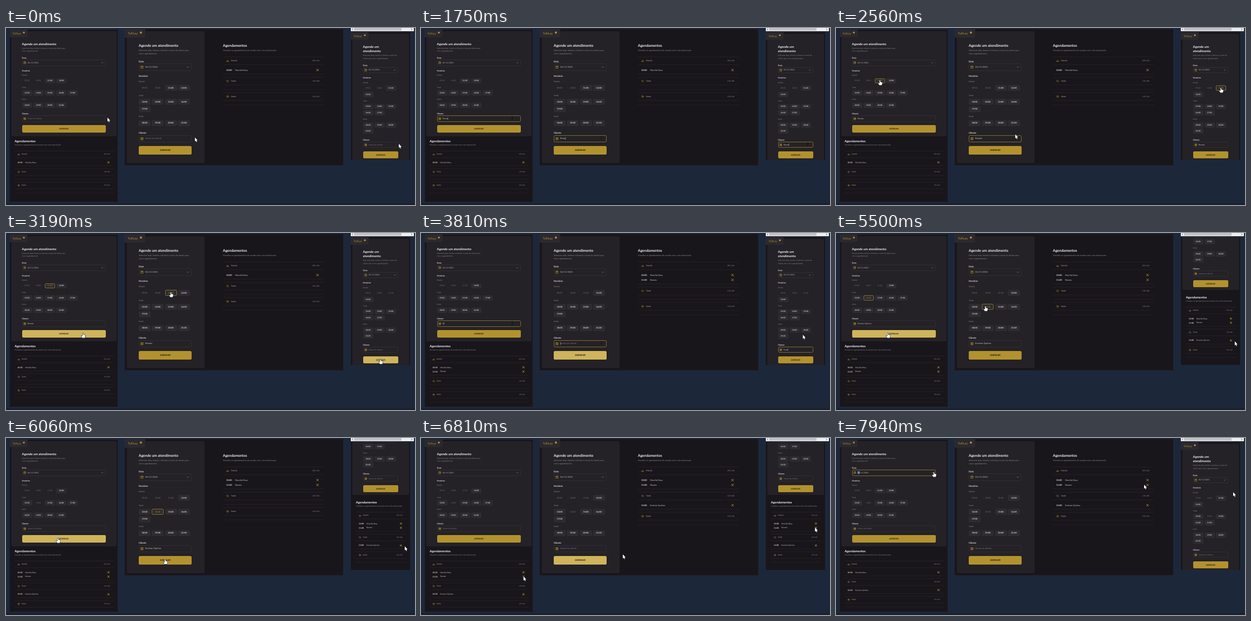
Animation, 758 px wide and 330 px high, one loop 8 s. Source, as an HTML page with a canvas:

```html
<!DOCTYPE html>
<html lang="pt-BR">
<head>
<meta charset="utf-8">
<title>Agendamentos</title>
<style>
  html, body { margin: 0; width: 100%; height: 100%; overflow: hidden; background: #1d273a; }
  canvas { display: block; }
</style>
</head>
<body>
<canvas id="stage" width="758" height="330"></canvas>
<script>
const ctx = document.getElementById('stage').getContext('2d');
ctx.textRendering = 'geometricPrecision';
ctx.textBaseline = 'middle';

const LOOP = 8000, STEP = 62.5, HOVER_LAG = 200;
const GOLD = '#b2922f', LIGHT_GOLD = '#cfb45c', OUTLINE = '#9a8033', CROSS = '#c9a93a',
      TITLE = '#f1eff3', TEXT = '#dedbe0', SOFT = '#8d8991', DIM = '#77737b',
      VIEW = '#19161b', PANEL = '#242226', SLOT = '#2e2b31', LINE = '#353238', RULE = '#29262c';
const BRAND = 'TuftLay';
const GUEST = 'Marcília Rosa';
const CLIENTS = ['Renato', 'Everton Quirino'];
const TYPE_DELAY = 200, TYPE_STEP = [150, 40];
const PERIODS = [
  { name: 'Manhã', first: 9, last: 12, span: '09h-12h' },
  { name: 'Tarde', first: 13, last: 17, span: '13h-18h' },
  { name: 'Noite', first: 18, last: 21, span: '19h-21h' }
];
const TITLE_LINES = ['Agende um atendimento'];
const INTRO_LINES = ['Selecione data, horário e informe o nome do cliente para', 'criar o agendamento'];

// Script entries: time of the click, what is clicked (a number is an hour,
// a point is a plain move) and how far along its width.
const VIEWS = [
  {
    x: 7, y: 3, w: 200, h: 321, s: 0.87, cols: 5, panel: [195, 196],
    list: { x: 16, w: 184, y: 211 }, title: TITLE_LINES, intro: INTRO_LINES,
    script: [[0, [188, 167]], [700, 'client', 0.9], [2500, 11], [3230, 'book', 0.73],
      [3550, 'client', 0.9], [4600, [49, 121]], [4850, 14], [5550, 'book', 0.43],
      [7000, 'remove'], [7650, 'date', 0.98]]
  },
  {
    x: 220, y: 2, w: 405, h: 254, s: 1, cols: 4, panel: [144, 246],
    list: { x: 402, w: 187, y: 33 }, title: TITLE_LINES, intro: INTRO_LINES,
    script: [[0, [350, 204]], [850, 'client', 0.9], [3100, 11], [3600, 'book'],
      [3750, 'client', 0.9], [5400, 14, 0.3], [6150, 'book'], [7020, [374, 217]], [7850, [571, 87]]]
  },
  {
    x: 639, y: 8, w: 110, h: 238, s: 0.87, cols: 3, panel: [105, 237],
    list: { x: 648.5, w: 93.5, y: 262 }, title: ['Agende um', 'atendimento'],
    intro: ['Selecione data, horário e informe o nome do', 'cliente para criar o agendamento'],
    scroll: t => 142 * (ease((t - 5050) / 300) - ease((t - 7200) / 300)),
    script: [[0, [728, 216]], [700, 'client', 0.85], [2350, 11], [3150, 'book'], [3430, 'client', 0.85],
      [4250, 14], [4420, [713, 182]], [4650, [710, 203]], [4950, 'book'], [5450, [739, 202]],
      [6950, 'remove', 0], [7800, [736, 101]]]
  }
];
VIEWS.forEach(view => { view.parts = layout(view); });

function ease(p) {
  p = Math.min(1, Math.max(0, p));
  return p * p * (3 - 2 * p);
}

// Flows the form downwards; returns the boxes of its controls and its labels.
function layout({ x: left, y: top, s, cols, panel, title, list }) {
  const x = left + 26 * s, w = panel[0] - 46 * s;
  const parts = { x, labels: [], slots: {}, titleY: top + 31 * s };
  let y = parts.titleY + (title.length - 1) * 10 * s;
  const down = d => y += d * s;
  const bar = height => ({ x, y: y - height * s / 2, w, h: height * s });
  const label = (str, size, color, weight) => parts.labels.push([str, x, y, size * s, color, weight]);
  parts.introY = y + 8.7 * s;

  down(29.5); label('Data', 4.4, TEXT, 700);
  down(10.4); parts.date = bar(13.4);
  down(17.1); label('Horários', 4.4, TEXT, 700);
  down(-4.3);
  for (const { name, first, last } of PERIODS) {
    down(14.2); label(name, 3.65, SOFT, 400);
    down(11.8);
    for (let hour = first; hour <= last; hour++) {
      const col = (hour - first) % cols;
      if (hour > first && !col) down(13.4);
      parts.slots[hour] = { x: x + col * 24.3 * s, y: y - 5.6 * s, w: 22 * s, h: 11.2 * s };
    }
  }
  down(18.6); label('Cliente', 4.4, TEXT, 700);
  down(10.5); parts.client = bar(13.4);
  down(21.7); parts.book = bar(15.6);
  parts.remove = { x: list.x + list.w - 13.6 * s, y: list.y + 52.5 * s, w: 4 * s, h: 4 * s };
  return parts;
}

function place(view, [time, target, along = 0.5]) {
  if (Array.isArray(target)) return target;
  const { x, y, w, h } = view.parts[target] || view.parts.slots[target];
  return [x + w * along, y + h * 0.4 - scrollOf(view, time)];
}

const scrollOf = (view, t) => view.scroll ? view.scroll(t) : 0;

// The pointer sets off at most 600 ms before a click and rests shortly before it.
function pointerAt(view, t) {
  const next = view.script.findIndex(([time]) => time > t);
  if (next < 0) return place(view, view.script.at(-1));
  const from = view.script[next - 1], to = view.script[next];
  const start = Math.max(from[0] + 100, to[0] - 600);
  const p = ease((t - start) / ((to[0] - start) * 0.65));
  const [x0, y0] = place(view, from), [x1, y1] = place(view, to);
  return [x0 + (x1 - x0) * p, y0 + (y1 - y0) * p];
}

function stateAt(view, t) {
  const state = { focus: '', picked: 0, booked: [[10, GUEST]] };
  let turn = 0, typingFrom = Infinity;
  for (const [time, target] of view.script) {
    if (time > t) break;
    if (Array.isArray(target)) continue;
    state.focus = target;
    if (target === 'client') typingFrom = time + TYPE_DELAY;
    if (target > 0) state.picked = target;
    if (target === 'remove') state.booked = state.booked.filter(([hour]) => hour !== 11);
    if (target === 'book') {
      state.booked.push([state.picked, CLIENTS[turn++]]);
      state.picked = 0;
      typingFrom = Infinity;
    }
  }
  const name = CLIENTS[turn] || '';
  state.typed = name.slice(0, Math.max(0, Math.floor((t - typingFrom) / TYPE_STEP[turn])));
  state.typing = state.typed.length < name.length;
  return state;
}

const inside = ([px, py], { x, y, w, h }) => px >= x && px <= x + w && py >= y && py <= y + h;

function rect({ x, y, w, h }, r, fill, stroke) {
  const l = Math.round(x), t = Math.round(y), width = Math.round(x + w) - l, height = Math.round(y + h) - t;
  ctx.beginPath();
  if (fill) {
    ctx.roundRect(l, t, width, height, r);
    ctx.fillStyle = fill;
    ctx.fill();
  }
  if (stroke) {
    ctx.beginPath();
    ctx.roundRect(l + 0.5, t + 0.5, width - 1, height - 1, r);
    ctx.strokeStyle = stroke;
    ctx.lineWidth = 0.8;
    ctx.stroke();
  }
}

const box = (x, y, w, h, fill, r = 0) => rect({ x, y, w, h }, r, fill);

function text(str, x, y, size, color = TEXT, weight = 400, align = 'left') {
  ctx.font = `${weight} ${size}px Lato, sans-serif`;
  ctx.fillStyle = color;
  ctx.textAlign = align;
  ctx.fillText(str, x, y);
}

function path(points, color, width, x = 0, y = 0, s = 1) {
  ctx.beginPath();
  points.forEach(([px, py], i) => ctx[i ? 'lineTo' : 'moveTo'](x + px * s, y + py * s));
  ctx.strokeStyle = color;
  ctx.lineWidth = width;
  ctx.stroke();
}

function fieldIcon(x, y, s, isDate) {
  ctx.strokeStyle = GOLD;
  ctx.lineWidth = 0.7;
  ctx.strokeRect(x - 2 * s, y - 1.8 * s, 4 * s, 4 * s);
  path([[-2, -0.5], [2, -0.5]], GOLD, 0.6, x, y, s);
  if (isDate) for (const tab of [-1, 1]) path([[tab, -2.7], [tab, -1.8]], GOLD, 0.6, x, y, s);
  else path([[-1, 1], [1, 1]], GOLD, 0.8, x, y, s);
}

function periodIcon(kind, x, y, s) {
  ctx.beginPath();
  if (kind === 0) ctx.arc(x, y + s, 1.6 * s, Math.PI, 0);
  else if (kind === 1) ctx.ellipse(x, y, 2 * s, 1.4 * s, 0.4, 0, 7);
  else ctx.arc(x, y, 1.8 * s, -0.6, 4.6);
  ctx.strokeStyle = GOLD;
  ctx.lineWidth = 0.6;
  ctx.stroke();
  if (kind === 0) path([[-2.4, 1.5], [2.4, 1.5]], GOLD, 0.6, x, y, s);
  if (kind === 2) path([[0, -1.8], [0, 0.2], [1.5, -0.8]], GOLD, 0.6, x, y, s);
}

function drawField({ x, y, w, h }, s, focused, isDate, str, color) {
  rect({ x, y, w, h }, 2, null, focused ? OUTLINE : LINE);
  fieldIcon(x + 6 * s, y + h / 2, s, isDate);
  text(str, x + 12 * s, y + h / 2, 4.2 * s, color);
}

function drawForm({ parts, s, title, intro }, state, hover) {
  const { x, date, client, book } = parts;
  const middle = part => part.y + part.h / 2;
  title.forEach((line, i) => text(line, x, parts.titleY + 10 * i * s, 6.7 * s, TITLE, 700));
  intro.forEach((line, i) => text(line, x, parts.introY + 6.4 * i * s, 3.75 * s, SOFT));
  parts.labels.forEach(label => text(...label));

  const dating = state.focus === 'date';
  if (dating) box(x + 11.5 * s, middle(date) - 2.7 * s, 5.5 * s, 5.4 * s, '#4677ba');
  drawField(date, s, dating, true, '06/11/2024', '#b9b5bc');
  path([[-1.6, -0.8], [0, 0.9], [1.6, -0.8]], SOFT, 0.7, x + date.w - 7 * s, middle(date), s);

  for (const [hour, slot] of Object.entries(parts.slots)) {
    const free = hour > 9 && !state.booked.some(b => b[0] === +hour);
    const active = free && (state.picked === +hour || inside(hover, slot));
    if (free) rect(slot, 1.8, SLOT, active && OUTLINE);
    text(hour.padStart(2, '0') + ':00', slot.x + 10.8 * s, middle(slot), 4 * s,
      active ? GOLD : free ? TEXT : DIM, free && !active ? 700 : 400, 'center');
  }

  const focused = state.focus === 'client';
  drawField(client, s, focused, false, state.typed || 'Nome do cliente', state.typed ? '#c9c5cc' : DIM);
  if (focused && state.typing) {
    const end = x + 12.6 * s + (state.typed && ctx.measureText(state.typed).width);
    path([[0, -2.4], [0, 2.4]], TEXT, 0.5, end, middle(client), s);
  }

  rect(book, 2.6 * s, inside(hover, book) ? LIGHT_GOLD : GOLD);
  text('AGENDAR', x + book.w / 2, middle(book), 4.1 * s, '#17120f', 700, 'center');
}

function drawList({ list, s }, state) {
  const { x, w } = list, right = x + w;
  text('Agendamentos', x, list.y, 6.7 * s, TITLE, 700);
  text('Visualize os agendamentos de acordo com o dia selecionado', x, list.y + 8.6 * s, 3.75 * s, SOFT);
  let y = list.y + 28 * s;
  PERIODS.forEach(({ name, first, last, span }, kind) => {
    const items = state.booked.filter(([hour]) => hour >= first && hour <= last);
    const height = (28.8 + 9.1 * items.length) * s;
    for (const edge of [-7 * s, 7.3 * s, height - 13 * s]) path([[x, y + edge], [right, y + edge]], RULE, 0.7);
    periodIcon(kind, x + 8.7 * s, y, s);
    text(name, x + 15 * s, y, 3.8 * s, '#a9a5ac');
    text(span, right - 8 * s, y, 3.5 * s, SOFT, 400, 'right');
    items.forEach(([hour, person], i) => {
      const row = y + (17.4 + 9.1 * i) * s;
      text(hour + ':00', x + 6 * s, row, 4.2 * s, TEXT, 700);
      text(person, x + 22.5 * s, row, 4 * s, '#c9c5cc');
      for (const tilt of [-2, 2]) path([[-2, -tilt], [2, tilt]], CROSS, 0.9, right - 11.6 * s, row, s);
    });
    y += height;
  });
}

const ARROW = [[0, 0], [0, 7.6], [1.7, 6.1], [2.9, 8.8], [4.1, 8.3], [3, 5.7], [5.2, 5.5]];
const HAND = [[-0.8, 0], [0.6, 0], [0.7, 3], [4.3, 4], [4.2, 6.6], [3.2, 9], [-1.2, 9], [-3.4, 5.4], [-2.6, 4.8], [-0.8, 6]];

function drawCursor([x, y], local, { slots, book, client, date }) {
  if (inside(local, client)) {
    path([[0, -3.5], [0, 3.5]], '#0c0b0d', 0.9, x, y);
    return;
  }
  const chevron = { ...date, x: date.x + date.w - 11, w: 11 };
  const clickable = [book, chevron, ...Object.values(slots).slice(2)].some(part => inside(local, part));
  path(clickable ? HAND : ARROW, '#111', 0.9, x, y);
  ctx.closePath();
  ctx.stroke();
  ctx.fillStyle = '#fff';
  ctx.fill();
}

function drawView(view, t) {
  const { x, y, w, h, s, panel } = view, scrolled = scrollOf(view, t);
  const state = stateAt(view, t);
  const local = ([px, py]) => [px, py + scrolled];
  const pointer = pointerAt(view, t), hover = pointerAt(view, Math.max(0, t - HOVER_LAG));

  ctx.save();
  ctx.beginPath();
  ctx.rect(x, y, w, h);
  ctx.clip();
  box(x, y, w, h, VIEW);
  ctx.translate(0, -scrolled);
  box(x + 4 * s, y + 4 * s, ...panel, PANEL, 3);
  box(x, y, 38 * s, 16 * s, '#2c292e', [0, 0, 3, 0]);
  text(BRAND, x + 6 * s, y + 8.7 * s, 5.6 * s, GOLD);
  ctx.beginPath();
  ctx.arc(x + 30 * s, y + 6.4 * s, 2 * s, 0, 7);
  ctx.fill();
  drawForm(view, state, local(hover));
  drawList(view, state);
  ctx.restore();
  drawCursor(pointer, local(pointer), view.parts);
}

function drawScrollbar() {
  box(639, 0, 117, 6, '#eeeef0');
  box(645, 0, 88, 5, '#c3c3c6');
  for (const [x, side] of [[642, 1], [752, -1]]) path([[side, -1.5], [-side * 0.6, 0], [side, 1.5]], '#555', 0.9, x, 2.7);
}

function frame(now) {
  const t = Math.floor((now % LOOP + 4) / STEP) * STEP % LOOP;
  box(0, 0, 758, 330, '#1d273a');
  box(0, 327, 758, 3, '#1a202d');
  VIEWS.forEach(view => drawView(view, t));
  drawScrollbar();
  requestAnimationFrame(frame);
}
requestAnimationFrame(frame);
</script>
</body>
</html>
```
